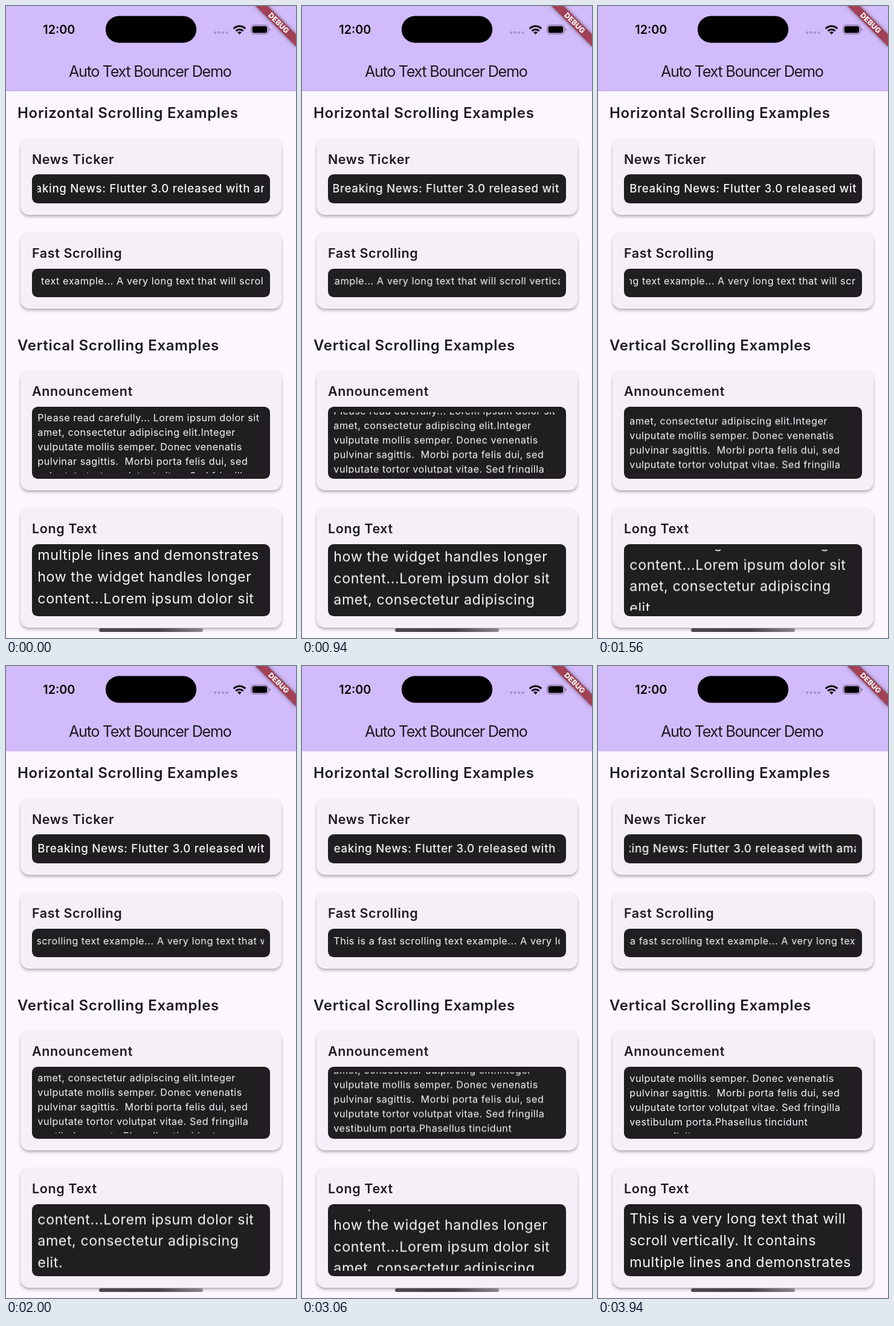
Recreate the animation shown at these times as an HTML page. Size 480 by 1044 pixels, loop 4000 ms.

```html
<!DOCTYPE html>
<html lang="en">
<head>
<meta charset="utf-8">
<title>Auto Text Bouncer Demo</title>
<style>
  html, body { margin: 0; width: 100%; height: 100%; overflow: hidden; }
  body {
    position: relative;
    background: #fcf7fe;
    color: #1d1a21;
    font-family: Inter, "Open Sans", sans-serif;
    font-optical-sizing: none;
    white-space: pre;
  }
  .stage { position: absolute; left: 0; top: 0; width: 480px; height: 1044px; overflow: hidden; }
  .stage div, .stage svg { position: absolute; }

  .bar { left: 0; top: 0; width: 480px; height: 141px; background: #d2bbfb; }
  .title { left: 104px; top: 92px; font-size: 25.2px; line-height: 32px; letter-spacing: -1.32px; }
  .clock { left: 61.3px; top: 27px; font-size: 19.8px; line-height: 24px; font-weight: 600; color: #000; }
  .status { left: 0; top: 0; }

  .section { left: 19px; font-size: 24px; line-height: 30px; font-weight: 600; letter-spacing: .69px; }
  .card {
    left: 23.9px; width: 432.2px; border-radius: 14.3px;
    background: #f5f0f7;
    box-shadow: 0 3px 5px rgba(0, 0, 0, .28), 0 1px 2px rgba(0, 0, 0, .06);
  }
  .name { left: 19px; top: 20px; font-size: 21.5px; line-height: 28px; font-weight: 600; letter-spacing: .63px; }
  .box { left: 19.1px; top: 59.7px; right: 19.1px; bottom: 19.1px; border-radius: 9.5px; background: #201e21; }
  .clip { left: 9.3px; right: 9.5px; top: 9.5px; bottom: 9.5px; overflow: hidden; }
  .run { left: 0; top: 0; color: #f8f6f9; animation: 4s -3ms infinite; }

  .news { font-size: 18.7px; line-height: 27.3px; font-weight: 500; letter-spacing: .68px; animation-name: news; }
  .fast { font-size: 16.2px; line-height: 23.9px; letter-spacing: .55px; animation-name: fast; }
  .note { font-size: 16.2px; line-height: 23.9px; letter-spacing: .51px; animation-name: note; animation-timing-function: steps(64); }
  .long { font-size: 23.2px; line-height: 35.85px; letter-spacing: .6px; animation-name: long; }

  /* 64 ticks of 62.5 ms per loop */
  @keyframes news {
    0% { transform: translateX(-36px); animation-timing-function: steps(16); }
    25%, 62.5% { transform: translateX(0); animation-timing-function: steps(24); }
    100% { transform: translateX(-53.7px); }
  }
  @keyframes fast {
    0% { transform: translateX(-178px); animation-timing-function: steps(11); }
    17.1875%, 18.75% { transform: translateX(-259.5px); animation-timing-function: steps(35); }
    73.4375%, 85.9375% { transform: translateX(0); animation-timing-function: steps(9); }
    100% { transform: translateX(-65px); }
  }
  @keyframes note {
    from { transform: translateY(-2.5px); }
    to { transform: translateY(-50.3px); }
  }
  @keyframes long {
    0% { transform: translateY(-80px); animation-timing-function: steps(29); }
    45.3125%, 67.1875% { transform: translateY(-144.5px); animation-timing-function: steps(19); }
    96.875%, 100% { transform: translateY(-2px); }
  }

  .home {
    left: 154px; top: 1028.4px; width: 172px; height: 6px; border-radius: 3px;
    background: linear-gradient(90deg, #4c494e, #454247 55%, #8b878e);
  }
  .debug {
    left: 432.2px; top: 33.4px; width: 95.6px; height: 14.4px;
    transform-origin: 47.8px -33.4px; transform: rotate(45deg);
    background: rgba(153, 42, 54, .84);
    box-shadow: 0 0 6px rgba(0, 0, 0, .5);
    color: #fff; font-size: 12px; line-height: 14.4px; font-weight: 800;
    letter-spacing: .2px; text-align: center;
  }
</style>
</head>
<body>
<div class="stage">
  <div class="bar"></div>
  <div class="clock">12:00</div>
  <svg class="status" width="480" height="80">
    <rect x="164.8" y="16.6" width="150.4" height="44.2" rx="22.1"/>
    <g fill="#a992cb">
      <circle cx="346.2" cy="44" r="2.2"/><circle cx="352.7" cy="44" r="2.2"/>
      <circle cx="359.2" cy="44" r="2.2"/><circle cx="365.7" cy="44" r="2.2"/>
    </g>
    <g fill="none" stroke="#000" stroke-width="3">
      <path d="M376.8 37.4a13.6 13.6 0 0 1 19.4 0"/>
      <path d="M380.4 41.2a8.6 8.6 0 0 1 12.2 0"/>
    </g>
    <path d="M386.5 47l-3.3-3.4a4.7 4.7 0 0 1 6.6 0z"/>
    <rect x="405.6" y="31.4" width="28.6" height="15" rx="4.8" fill="none" stroke="#8675a4" stroke-width="1.2"/>
    <rect x="407.6" y="33.3" width="24.6" height="11.2" rx="3.2"/>
    <path d="M435.8 36.4q2.2 .8 2.2 2.5t-2.2 2.5z" fill="#8675a4"/>
  </svg>
  <div class="title">Auto Text Bouncer Demo</div>

  <div class="section" style="top:162px">Horizontal Scrolling Examples</div>
  <div class="card" style="top:218.6px;height:126.6px">
    <div class="name">News Ticker</div>
    <div class="box"><div class="clip"><div class="run news">Breaking News: Flutter 3.0 released with amazing new features!</div></div></div>
  </div>
  <div class="card" style="top:373.9px;height:126.6px">
    <div class="name">Fast Scrolling</div>
    <div class="box"><div class="clip"><div class="run fast">This is a fast scrolling text example... A very long text that will scroll vertically.</div></div></div>
  </div>

  <div class="section" style="top:545.5px">Vertical Scrolling Examples</div>
  <div class="card" style="top:602px;height:198.3px">
    <div class="name">Announcement</div>
    <div class="box"><div class="clip"><div class="run note">Please read carefully... Lorem ipsum dolor sit
amet, consectetur adipiscing elit.Integer
vulputate mollis semper. Donec venenatis
pulvinar sagittis.  Morbi porta felis dui, sed
vulputate tortor volutpat vitae. Sed fringilla
vestibulum porta.Phasellus tincidunt
posuere finibus.</div></div></div>
  </div>
  <div class="card" style="top:829px;height:198.3px">
    <div class="name">Long Text</div>
    <div class="box"><div class="clip"><div class="run long">This is a very long text that will
scroll vertically. It contains
multiple lines and demonstrates
how the widget handles longer
content...Lorem ipsum dolor sit
amet, consectetur adipiscing
elit.</div></div></div>
  </div>

  <div class="home"></div>
  <div class="debug">DEBUG</div>
</div>
</body>
</html>
```
